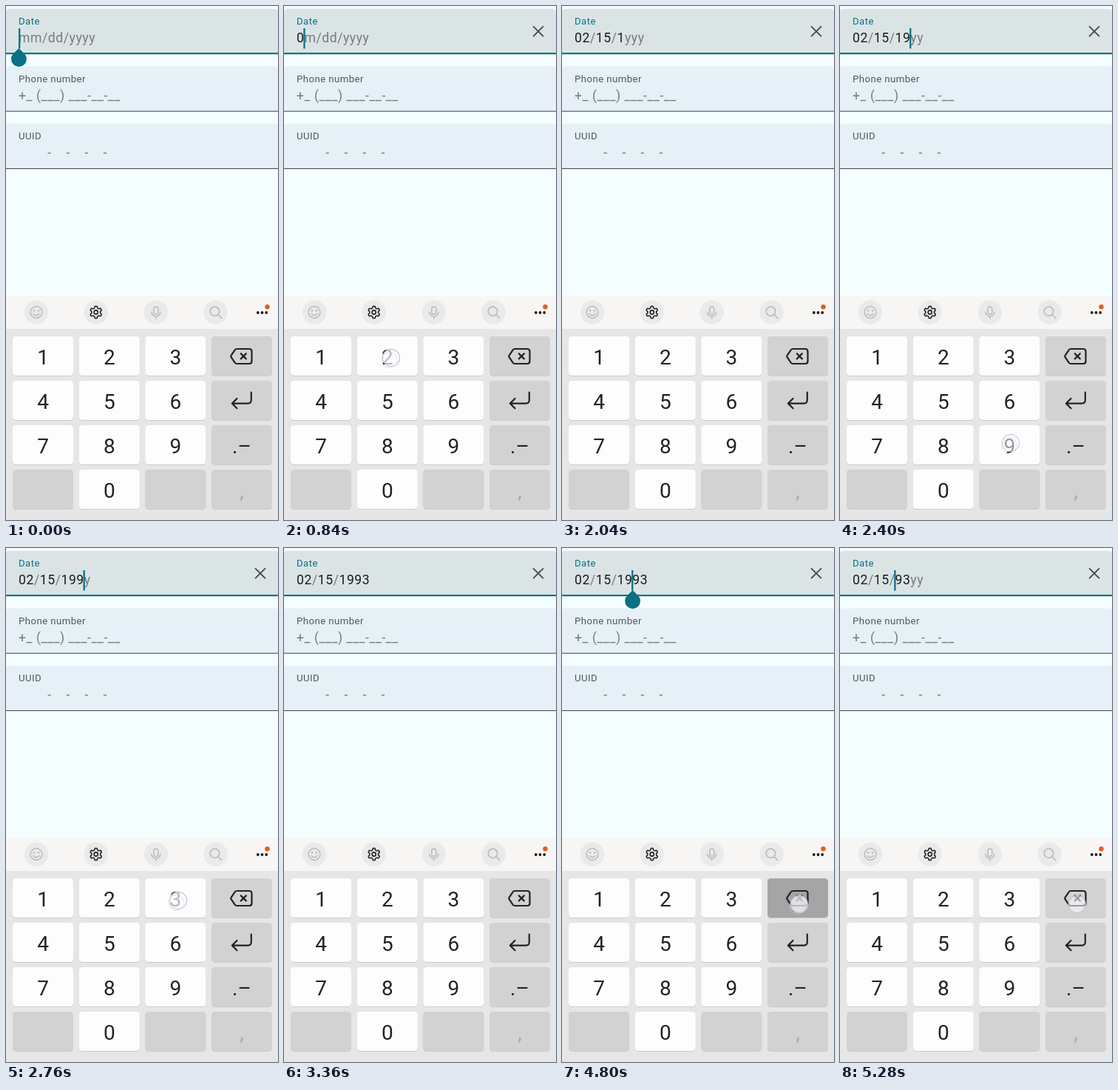
An HTML page that plays this animation: 368x694 px, repeating every 5400 ms.

```html
<!DOCTYPE html>
<html lang="en">
<head>
<meta charset="utf-8">
<title>Masked date input</title>
<style>
  html, body { margin: 0; width: 100%; height: 100%; overflow: hidden; background: #f4fefe; }
  svg { display: block; font-family: Roboto, Arial, sans-serif; }
  text { white-space: pre; }
  .label { font-size: 13.2px; letter-spacing: .44px; fill: #4d595f; }
  .value { font-size: 17.6px; letter-spacing: .55px; fill: #737c80; }
  .typed { fill: #1a1d1f; }
  .key { font-size: 28px; fill: #222; text-anchor: middle; }
  .line { fill: none; stroke-linecap: round; stroke-linejoin: round; }
</style>
</head>
<body>
<svg id="stage" width="368" height="694" viewBox="0 0 368 694"></svg>
<script>
const TICK = 120, TICKS = 45;
const MASK = 'mm/dd/yyyy';
const TEAL = '#0a7184';
const COLS = [9, 98.8, 188.3, 278], ROWS = [446, 506, 566, 626];
const KEYS = ['1', '2', '3', '', '4', '5', '6', '', '7', '8', '9', '.–', '', '0', '', ','];
const BACKSPACE = 3;

const TOUCH = {
  zero: [140, 651], one: [58, 475], two: [145, 475], three: [233, 476],
  five: [152, 539], nine: [231, 590], back: [321, 481], field: [92, 29]
};

// [tick, digits, caret index (-1 hidden), handle index (-1 hidden), touch, strength, dark key]
const STEPS = [
  [0, '', 0, 0],
  [1, '', 0, 0, 'zero', 1],
  [2, '0', 1, -1, 'zero', 1],
  [3, '0', 1, -1, 'zero', .7],
  [4, '0', 1, -1],
  [6, '0', 1, -1, 'two', .7],
  [7, '0', 1, -1, 'two', 1],
  [8, '02', 2, -1, 'two', 1],
  [9, '02', 2, -1, 'two', .6],
  [10, '02', 2, -1, 'one', .7],
  [11, '02', 2, -1, 'one', 1, 0],
  [12, '021', 3, -1, 'one', .7],
  [13, '021', 3, -1, 'five', 1],
  [14, '0215', 4, -1, 'five', .7],
  [15, '0215', 4, -1, 'one', .7],
  [16, '0215', 4, -1, 'one', 1, 0],
  [17, '02151', -1, -1],
  [18, '02151', 5, -1, 'nine', .7],
  [19, '02151', 5, -1, 'nine', 1, 10],
  [20, '021519', 6, -1, 'nine', .8],
  [21, '021519', 6, -1, 'nine', 1],
  [22, '0215199', 7, -1, 'nine', .7],
  [23, '0215199', 7, -1, 'three', 1],
  [24, '02151993', 8, -1, 'three', .7],
  [25, '02151993', 8, -1],
  [28, '02151993', -1, -1],
  [31, '02151993', -1, -1, 'field', .7],
  [32, '02151993', 6, -1, 'field', 1],
  [33, '02151993', 6, 6, 'field', .7],
  [34, '02151993', 6, 6, 'field', .3],
  [35, '02151993', -1, 6],
  [39, '02151993', 6, 6, 'back', .7],
  [40, '02151993', 6, 6, 'back', 1, BACKSPACE],
  [41, '0215193', 5, -1, 'back', .7],
  [42, '0215193', 5, -1, 'back', 1, BACKSPACE],
  [43, '021593', 4, -1, 'back', 1],
  [44, '021593', 4, -1, 'back', .8]
];

const line = (d, color, width) =>
  `<path class="line" d="${d}" stroke="${color}" stroke-width="${width}"/>`;
const ring = (x, y, r, color, width) =>
  `<circle cx="${x}" cy="${y}" r="${r}" fill="none" stroke="${color}" stroke-width="${width}"/>`;
const dot = (x, y, r, color) => `<circle cx="${x}" cy="${y}" r="${r}" fill="${color}"/>`;

function field(y, label, value, active) {
  const fill = active ? '#dbe4e5' : '#e6f0f6';
  const edge = active
    ? `<rect y="${y + 59}" width="368" height="2.2" fill="${TEAL}"/>`
    : `<rect y="${y + 60.2}" width="368" height="1.1" fill="#4a5257"/>`;
  return `<path d="M0 ${y + 61}V${y + 4}q0 -4 4 -4H364q4 0 4 4V${y + 61}z" fill="${fill}"/>${edge}
    <text class="label" x="17" y="${y + 21.3}"${active ? ` style="fill:${TEAL}"` : ''}>${label}</text>
    <text class="value" x="17" y="${y + 45.3}"${active ? ' id="date"' : ''}>${value}</text>`;
}

function gear(cx, cy) {
  const points = Array.from({ length: 72 }, (_, i) => {
    const a = i * Math.PI / 36;
    const r = 7 + Math.max(-1, Math.min(1, 1.8 * Math.cos(6 * a + Math.PI))) * 1.1;
    return `${(cx + r * Math.cos(a)).toFixed(2)} ${(cy + r * Math.sin(a)).toFixed(2)}`;
  });
  return line(`M${points.join('L')}z`, '#222', 1.6) + ring(cx, cy, 2.6, '#222', 1.6);
}

function toolbar() {
  const pale = '#bababa';
  return '<rect y="391.5" width="368" height="45" fill="#f7f6f5"/>' +
    [41, 121.7, 202.8, 283.6].map(x => dot(x, 413.5, 16.2, '#ebeaea')).join('') +
    ring(41, 413.5, 7.9, pale, 1.5) + dot(38, 411.3, 1.2, pale) + dot(44, 411.3, 1.2, pale) +
    line('M37 415.5q4 4.6 8 0', pale, 1.5) +
    gear(121.7, 413.5) +
    line('M199.8 409a3 3 0 0 1 6 0v4.5a3 3 0 0 1 -6 0zM196.8 413.3a6 6 0 0 0 12 0M202.8 419.5v2.5', pale, 1.5) +
    ring(282.4, 412.2, 6.2, pale, 1.6) + line('M287 416.8l4.6 4.6', pale, 1.6) +
    [340.8, 346.5, 352.2].map(x => dot(x, 414, 1.9, '#1c1c1c')).join('') +
    dot(353.5, 406.3, 3.2, '#e0601a');
}

const keyFill = i => (i % 4 === 3 || i === 12 || i === 14) ? '#d2d2d2' : '#fdfdfd';

function keyboard() {
  const keys = KEYS.map((name, i) => {
    const x = COLS[i % 4], y = ROWS[i >> 2];
    const box = (dy, attrs) =>
      `<rect x="${x}" y="${y + dy}" width="82" height="53" rx="4.5" ${attrs}/>`;
    const color = name === ',' ? ' style="fill:#a8a8a8"' : '';
    return box(1, 'fill="#cbcbcb"') + box(0, `id="k${i}" fill="${keyFill(i)}"`) +
      `<text class="key" x="${x + 41}" y="${y + 38}"${color}>${name}</text>`;
  }).join('');
  return '<rect y="436" width="368" height="258" fill="#e6e6e6"/>' + keys +
    line('M312.2 463H329q3.5 0 3.5 3.5v13q0 3.5 -3.5 3.5H312.2q-1.5 0 -2.5 -1.3L304.6 474.2q-.8 -1.2 0 -2.4L309.7 464.3q1 -1.3 2.5 -1.3z', '#222', 2.2) +
    line('M317.8 469.4l7 7m0 -7l-7 7', '#222', 2.2) +
    line('M331.8 521.5v10.5q0 4.6 -4.6 4.6H306M312.5 530l-6.6 6.6l6.6 6.6', '#222', 2.2);
}

const stage = document.getElementById('stage');
stage.innerHTML = '<rect width="368" height="694" fill="#f4fefe"/>' +
  field(4, 'Date', '', true) +
  field(81.4, 'Phone number', '+_ (___) ___-__-__') +
  field(158.8, 'UUID', '        -    -    -    -') +
  `<g id="clear">${line('M337.6 27.8l12.8 12.8m0 -12.8l-12.8 12.8', '#454d51', 1.9)}</g>
  <rect id="caret" y="30" width="2.3" height="27.5" fill="${TEAL}"/>` +
  toolbar() + keyboard() +
  `<path id="handle" d="M0 -14.7L7.4 -7.4A10.45 10.45 0 1 1 -7.4 -7.4z" fill="${TEAL}"/>
  <g id="touch">${dot(0, 0, 11.5, 'rgba(255,255,255,.68)')}${ring(0, 0, 11.5, '#bfc6da', 1.3)}${ring(-2.5, 3, 10.5, 'rgba(200,207,226,.6)', 1)}</g>`;

const part = Object.fromEntries(
  ['date', 'clear', 'caret', 'handle', 'touch'].map(id => [id, document.getElementById(id)]));
const keyBoxes = KEYS.map((_, i) => document.getElementById('k' + i));
const show = (el, on) => el.setAttribute('visibility', on ? 'visible' : 'hidden');

// Slashes after the second and fourth digits belong to the text before the caret.
const caretX = n => 17 + n * 10.43 + ((n >= 2) + (n >= 4)) * 7.8;

function maskedText(digits) {
  let n = 0;
  return [...MASK].map(c => c !== '/' && n < digits.length
    ? `<tspan class="typed">${digits[n++]}</tspan>` : c).join('');
}

function render([, digits, caret, handle, touch, strength, dark]) {
  part.date.innerHTML = maskedText(digits);
  show(part.clear, digits);
  show(part.caret, caret >= 0);
  part.caret.setAttribute('x', Math.max(17, caretX(caret) - 1.1));
  show(part.handle, handle >= 0);
  part.handle.setAttribute('transform', `translate(${caretX(handle) + .4} 71.6)`);
  show(part.touch, touch);
  if (touch) {
    part.touch.setAttribute('transform', `translate(${TOUCH[touch]})`);
    part.touch.setAttribute('opacity', strength);
  }
  keyBoxes.forEach((box, i) => box.setAttribute('fill', i === dark ? '#a5a5a5' : keyFill(i)));
}

const start = performance.now();
let current = null;
function loop() {
  const tick = Math.floor((performance.now() - start) / TICK) % TICKS;
  const step = STEPS.findLast(s => s[0] <= tick);
  if (step !== current) render(current = step);
  requestAnimationFrame(loop);
}
loop();
</script>
</body>
</html>
```
